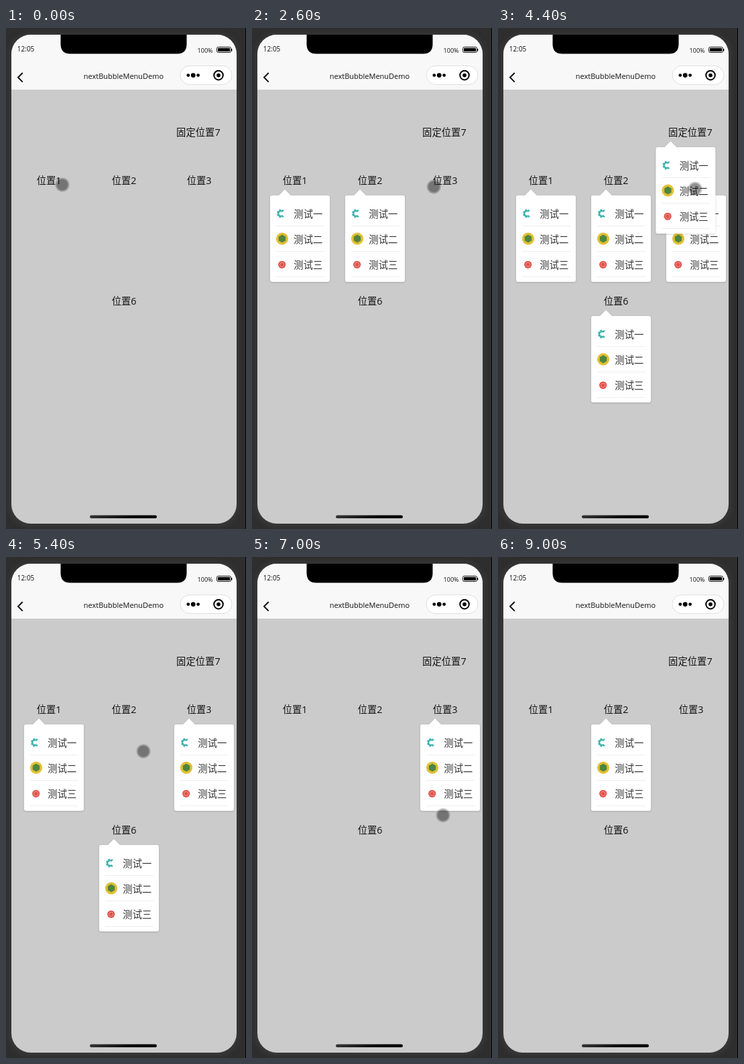
An HTML page for the animation above (9100 ms loop, 358 by 748 pixels).

```html
<!DOCTYPE html>
<html lang="zh-CN">
<head>
<meta charset="utf-8">
<title>nextBubbleMenuDemo</title>
<style>
html, body { margin: 0; width: 100%; height: 100%; overflow: hidden; background: #2e2e2e; }
svg { display: block; width: 358px; height: 748px; }
text { font-family: "Open Sans", "Noto Sans CJK SC", "Noto Sans CJK", sans-serif; fill: #111; }
.label, .item { font-size: 14.34px; }
.item { fill: #333; }
.card { filter: drop-shadow(0 1px 1.5px rgba(0, 0, 0, .16)); }
</style>
</head>
<body>
<svg viewBox="0 0 358 748">
  <defs>
    <clipPath id="screen"><rect x="8" y="10" width="336" height="730" rx="29"/></clipPath>
    <filter id="glow" x="-10%" y="-5%" width="120%" height="110%"><feGaussianBlur stdDeviation="4"/></filter>
    <radialGradient id="touch">
      <stop offset=".7" stop-opacity=".43"/>
      <stop offset=".82" stop-opacity=".27"/>
      <stop offset="1" stop-opacity=".1"/>
    </radialGradient>
    <linearGradient id="bar"><stop stop-color="#333"/><stop offset=".7"/></linearGradient>
    <!-- bubble drawn relative to the left end of its label's baseline -->
    <g id="menu">
      <path class="card" fill="#fff" d="M-16 17H-6L3 8L12 17H67Q70 17 70 20V143Q70 146 67 146H-16Q-19 146 -19 143V20Q-19 17 -16 17Z"/>
      <g fill="none" stroke="#3fb3ae">
        <path d="M0 41.2A4 4 0 1 0 0 46.8" stroke-width="2.4"/>
        <path d="M1.3 40A5.6 5.6 0 1 0 1.3 48" stroke-width="1.6" stroke-dasharray="2.6 2"/>
      </g>
      <circle cx="-1" cy="81.6" r="9.1" fill="#e2c034"/>
      <path d="M-1 75.6L4.2 78.6V84.6L-1 87.6L-6.2 84.6V78.6Z" fill="#4f8540"/>
      <circle cx="-1.3" cy="120.3" r="5.6" fill="#e0524b"/>
      <circle cx="-1.3" cy="120.3" r="3.2" fill="none" stroke="#f2a09a" stroke-width=".9"/>
    </g>
  </defs>

  <rect width="358" height="748" fill="#2e2e2e"/>
  <rect x="6" y="9" width="340" height="734" rx="29" fill="#3a3a3a" filter="url(#glow)"/>
  <rect x="357" width="1" height="748"/>

  <g clip-path="url(#screen)">
    <rect x="8" y="10" width="336" height="730" fill="#cbcbcb"/>
    <rect x="8" y="10" width="336" height="82" fill="#f8f8f8"/>
    <path d="M81.5 10H269.5V24Q269.5 38.6 255 38.6H96Q81.5 38.6 81.5 24Z"/>
    <text x="16.8" y="35" font-size="10">12:05</text>
    <text x="285.6" y="36.6" font-size="9">100%</text>
    <rect x="314.5" y="28.5" width="21" height="8" rx="2" fill="none" stroke="#111"/>
    <rect x="316" y="30" width="18" height="5" rx=".5"/>
    <path d="M336.7 31V34.4" stroke="#111" stroke-width="1.3"/>
    <path d="M24.8 67L18 73.8L24.8 80.6" fill="none" stroke="#111" stroke-width="2"/>
    <text x="175.5" y="76.4" font-size="11" text-anchor="middle">nextBubbleMenuDemo</text>
    <rect x="260" y="56.5" width="77" height="28" rx="14" fill="#fff" stroke="#dedede"/>
    <circle cx="271.8" cy="70.6" r="2.4"/>
    <circle cx="279.2" cy="70.6" r="3.4"/>
    <circle cx="286.6" cy="70.6" r="2.4"/>
    <circle cx="317" cy="70.6" r="6.8" fill="none" stroke="#000" stroke-width="2"/>
    <circle cx="317" cy="70.6" r="2.9"/>
    <g id="labels"></g>
    <rect x="125" y="727.5" width="100" height="4.6" rx="2.3" fill="url(#bar)"/>
    <g id="menus"></g>
  </g>
  <circle id="cursor" r="10.8" fill="url(#touch)"/>
</svg>
<script>
const LOOP = 9100, TICK = 100, TRAVEL = 300, CLICK_LEAD = 100, GONE = 8400;
const LEFT = 46, TOP = 233, COLUMN = 112, ROW = 38.2;

const spots = [
  { text: "位置1", x: LEFT, y: TOP },
  { text: "位置2", x: LEFT + COLUMN, y: TOP },
  { text: "位置3", x: LEFT + 2 * COLUMN, y: TOP },
  { text: "位置6", x: LEFT + COLUMN, y: TOP + 180 },
  { text: "固定位置7", x: 254.4, y: TOP - 72 }
];

// The pointer rests at x, y until `go`; a spot index toggles that bubble just before.
const stop = (go, x, y, spot) => ({ go, x, y, spot });
const stops = [
  stop(0, 84, 234), stop(750, 74, 235, 0),
  stop(1200, 174, 246), stop(1300, 249, 243), stop(1700, 187.5, 252),
  stop(2400, 189, 240, 1), stop(2900, 300, 236, 2), stop(3600, 203.5, 421, 3),
  stop(4100, 300, 168, 4), stop(4400, 294, 240), stop(4900, 311, 264, 4),
  stop(5400, 205, 290, 1), stop(5700, 150, 310), stop(6100, 85, 310, 0),
  stop(6600, 205, 490, 3), stop(6850, 270, 490), stop(7500, 300, 281, 2),
  stop(8100, 188.5, 237, 1), stop(LOOP, 430, 485)
];

const $ = id => document.getElementById(id);
const cursor = $("cursor");

function add(parent, tag, attrs, text = "") {
  const node = document.createElementNS("http://www.w3.org/2000/svg", tag);
  for (const name in attrs) node.setAttribute(name, attrs[name]);
  node.textContent = text;
  return parent.appendChild(node);
}

["测试一", "测试二", "测试三"].forEach((text, i) => {
  const y = 50 + i * ROW;
  add($("menu"), "text", { class: "item", x: 16.3, y }, text);
  add($("menu"), "path", { d: `M-10 ${62.5 + i * 38}h72`, stroke: "#eee" });
});

const bubbles = spots.map(({ text, x, y }) => {
  add($("labels"), "text", { class: "label", x: x - .3, y: y + .2 }, text);
  return add($("menus"), "use", { href: "#menu", x, y });
});

const ease = k => k * k * (3 - 2 * k);

function cursorAt(t) {
  const i = stops.findIndex(s => s.go > t);
  const a = stops[i - 1], b = stops[i];
  const k = ease(Math.min(1, (t - a.go) / Math.min(TRAVEL, b.go - a.go)));
  return [a.x + (b.x - a.x) * k, a.y + (b.y - a.y) * k];
}

function isOpen(spot, t) {
  const clicks = stops.filter(s => s.spot === spot && s.go - CLICK_LEAD <= t);
  return clicks.length % 2 === 1;
}

function draw(now) {
  const t = Math.floor((now % LOOP) / TICK) * TICK;
  bubbles.forEach((node, i) => {
    node.style.display = isOpen(i, t) ? "" : "none";
  });
  const [x, y] = cursorAt(t);
  cursor.setAttribute("cx", x);
  cursor.setAttribute("cy", y);
  cursor.style.display = t < GONE ? "" : "none";
}

function loop(now) {
  draw(now);
  requestAnimationFrame(loop);
}
draw(0);
requestAnimationFrame(loop);
</script>
</body>
</html>
```
